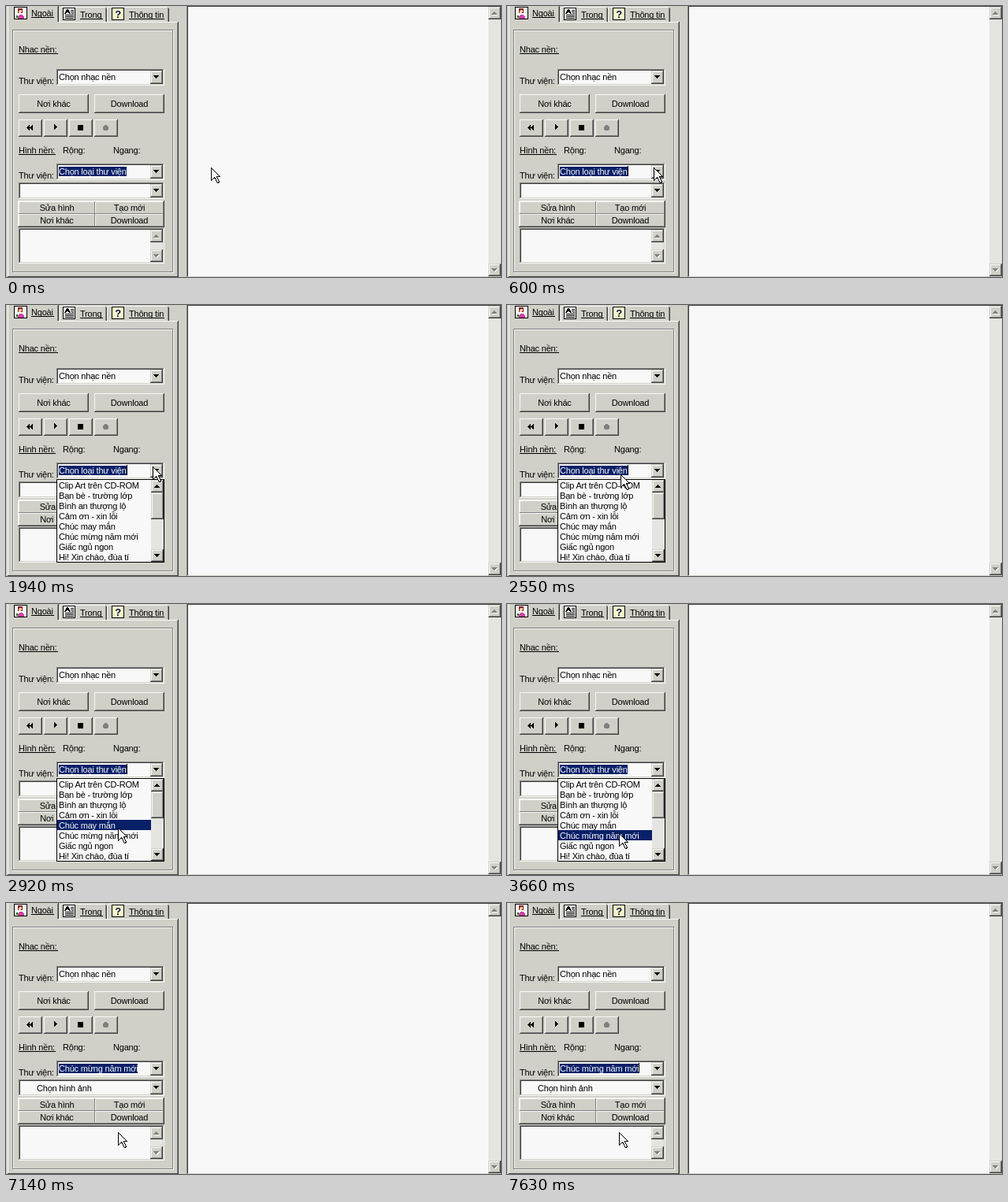
Recreate the animation shown at these times as an HTML page. Size 628 by 344 pixels, loop 8000 ms.

```html
<!DOCTYPE html>
<html lang="vi">
<head>
<meta charset="utf-8">
<style>
html, body { margin: 0; width: 100%; height: 100%; overflow: hidden; background: #d0d0c8; }
svg { display: block; width: 628px; height: 344px; shape-rendering: crispEdges; }
text { font: 11px "Liberation Sans", Arial, sans-serif; letter-spacing: -.2px; white-space: pre; }
</style>
</head>
<body>
<svg id="stage" viewBox="0 0 628 344" xmlns="http://www.w3.org/2000/svg"></svg>
<script>
const FACE = '#d0d0c8', PAPER = '#f8f8f8', SHADE = '#808080', DARK = '#000', EDGE = '#404040';
const NAVY = '#082068', TRACK = '#e4e4e0';
const LOOP = 8000, ROW = 13, LIST_TOP = 221, LIST_H = 106;
const ITEMS = ['Clip Art trên CD-ROM', 'Bạn bè - trường lớp', 'Bình an thượng lộ', 'Cảm ơn - xin lỗi',
  'Chúc may mắn', 'Chúc mừng năm mới', 'Giấc ngủ ngon', 'Hi! Xin chào, đùa tí'];

// pointer: time, x, y
const MOVES = [[0, 260, 205], [120, 257, 197], [360, 236, 200], [480, 208, 203], [600, 186, 205],
  [2060, 165, 206], [2180, 144, 206], [2550, 144, 215],
  [2800, 143, 256], [2920, 142, 284], [3040, 142, 291]];
const BLINKS = [480, 1080, 1700, 2180, 2550, 3660, 5030, 7140, 7630];

const rect = (x, y, w, h, fill, more = '') =>
  `<rect x="${x}" y="${y}" width="${w}" height="${h}" fill="${fill}" ${more}/>`;
const path = (d, fill, more = '') => `<path d="${d}" fill="${fill}" ${more}/>`;
const label = (x, y, s, more = '') => `<text x="${x}" y="${y}" ${more}>${s}</text>`;
const centred = (x, y, s) => label(x, y, s, 'text-anchor="middle"');

function underlined(x, y, s, w) {
  return label(x, y, s) + rect(x, y + 1, w, 1, DARK);
}
function bevel(x, y, w, h, outer, inner) {
  return rect(x, y, w, h, EDGE) + rect(x, y, w - 1, h - 1, outer) + rect(x + 1, y + 1, w - 2, h - 2, SHADE) +
    rect(x + 1, y + 1, w - 3, h - 3, inner) + rect(x + 2, y + 2, w - 4, h - 4, FACE);
}
const button = (x, y, w, h) => bevel(x, y, w, h, PAPER, FACE);
const knob = (x, y, w, h) => bevel(x, y, w, h, FACE, PAPER);
function thin(x, y, w, h) {
  return rect(x, y, w, h, SHADE) + rect(x, y, w - 1, h - 1, PAPER) + rect(x + 1, y + 1, w - 2, h - 2, FACE);
}
function sunken(x, y, w, h) {
  return rect(x, y, w, h, PAPER) + rect(x, y, w - 1, h - 1, SHADE) + rect(x + 1, y + 1, w - 2, h - 2, FACE) +
    rect(x + 1, y + 1, w - 3, h - 3, EDGE) + rect(x + 2, y + 2, w - 4, h - 4, PAPER);
}
function arrow(x, y, turn = 0, fill = DARK) {
  return path('M-3 0h7v1h-1v1h-1v1h-1v1h-1v-1h-1v-1h-1v-1h-1z', fill,
    `transform="translate(${x} ${y}) ${turn === 180 ? 'scale(1 -1)' : `rotate(${turn})`}"`);
}
function scrollButton(x, y, w, h, up, off) {
  const ax = x + (w >> 1) - 1, ay = y + (h >> 1) + (up ? 2 : -2);
  return knob(x, y, w, h) + (off ? arrow(ax + 1, ay + 1, up ? 180 : 0, PAPER) : '') +
    arrow(ax, ay, up ? 180 : 0, off ? SHADE : DARK);
}
function combo(x, y, w, h) {
  return sunken(x, y, w, h) + scrollButton(x + w - 18, y + 2, 16, h - 4, false);
}

function tabs() {
  return rect(2, 0, 1, 344, PAPER) +
    rect(67, 20, 151, 1, PAPER) + rect(217, 21, 1, 323, SHADE) + rect(218, 20, 1, 324, EDGE) +
    rect(2, 343, 217, 1, EDGE) +
    rect(65, 1, 1, 19, SHADE) + rect(66, 0, 1, 20, EDGE) +
    [[68, 127], [128, 206]].map(([a, b]) => rect(a + 1, 1, b - a - 2, 1, PAPER) + rect(a, 2, 1, 18, PAPER) +
      rect(b - 1, 2, 1, 18, SHADE) + rect(b, 3, 1, 17, EDGE)).join('') +
    // person
    rect(10, 1, 17, 16, DARK) + rect(11, 2, 15, 14, PAPER) +
    '<circle cx="18" cy="6" r="3.5" fill="#802020"/><circle cx="18" cy="7" r="2" fill="#f8c8a0"/>' +
    path('M15 16v-3l2-2h3l3 2v3z', '#d040a0') + rect(13, 12, 2, 3, '#208020') +
    // page
    rect(72, 2, 16, 16, DARK) + rect(73, 3, 14, 14, PAPER) +
    path('M77 4h2l3 6h-2l-1-2h-2l-1 2h-2z', DARK) +
    rect(82, 5, 4, 1, DARK) + rect(82, 7, 4, 1, DARK) + rect(83, 9, 3, 1, DARK) +
    [11, 13, 15].map(y => rect(75, y, 11, 1, DARK)).join('') +
    // help
    rect(134, 2, 16, 16, DARK) + rect(135, 3, 14, 14, '#f8f8c8') +
    label(142, 15, '?', 'text-anchor="middle" fill="#101050" style="font-weight:700;font-size:13px"') +
    underlined(32, 13, 'Ngoài', 29) + underlined(94, 15, 'Trong', 29) + underlined(156, 15, 'Thông tin', 45);
}

function panel() {
  const frame = (x, y, stroke) => rect(x + .5, y + .5, 203, 307, 'none', `stroke="${stroke}"`);
  return frame(9, 31, PAPER) + frame(8, 30, SHADE) +
    underlined(16, 59, 'Nhạc nền:', 50) +
    label(16, 99, 'Thư viện:') + combo(64, 80, 137, 21) + label(67, 94, 'Chọn nhạc nền') +
    button(16, 112, 89, 24) + centred(60.5, 128, 'Nơi khác') +
    button(112, 112, 89, 24) + centred(156.5, 128, 'Download') +
    [16, 48, 80, 112].map(x => button(x, 144, 30, 22)).join('') +
    arrow(30, 154, 90) + arrow(34, 154, 90) + arrow(61, 154, -90) + rect(91, 151, 7, 7, DARK) +
    '<circle cx="126.5" cy="154.5" r="3.5" fill="#808080"/>' +
    underlined(16, 187, 'Hình nền:', 47) + label(72, 187, 'Rộng:') + label(136, 187, 'Ngang:') +
    label(16, 219, 'Thư viện:') + combo(64, 200, 137, 21) + combo(16, 224, 185, 21) +
    rect(15, 247, 186, 34, EDGE) + rect(15, 247, 185, 33, PAPER) +
    thin(16, 248, 97, 16) + thin(113, 248, 87, 16) + thin(16, 264, 97, 16) + thin(113, 264, 87, 16) +
    centred(64.5, 260, 'Sửa hình') + centred(156.5, 260, 'Tạo mới') +
    centred(64.5, 276, 'Nơi khác') + centred(156.5, 276, 'Download') +
    sunken(16, 282, 185, 45) + rect(183, 284, 16, 41, TRACK) +
    scrollButton(183, 284, 16, 16, true, true) + scrollButton(183, 309, 16, 16, false, true);
}

function page() {
  return rect(229, 0, 399, 344, PAPER) + rect(229, 0, 1, 344, SHADE) + rect(230, 0, 1, 343, EDGE) +
    rect(230, 0, 398, 1, EDGE) + rect(612, 1, 16, 342, TRACK) +
    scrollButton(612, 1, 16, 16, true, true) + scrollButton(612, 327, 16, 16, false, true) +
    rect(230, 343, 398, 1, FACE);
}

function dropList() {
  return rect(64, LIST_TOP, 137, LIST_H, DARK) + rect(65, LIST_TOP + 1, 135, LIST_H - 2, PAPER) +
    rect(65, 0, 119, ROW, NAVY, 'id="hover"') +
    ITEMS.map((s, i) => label(67, 233 + i * ROW, s, 'class="item"')).join('') +
    rect(184, 222, 16, 104, TRACK) + scrollButton(184, 222, 16, 16, true) +
    knob(184, 238, 16, 34) + scrollButton(184, 310, 16, 16, false);
}

const stage = document.getElementById('stage');
stage.innerHTML = `<clipPath id="clip">${rect(64, 0, 137, 0, DARK, 'id="window"')}</clipPath>` +
  rect(0, 0, 628, 344, FACE) + tabs() + panel() + page() +
  `<g id="pressed">${rect(183, 202, 16, 17, SHADE) + rect(184, 203, 14, 15, FACE) + arrow(191, 209)}</g>` +
  rect(67, 204, 86, 12, NAVY, 'id="mark"') + label(67, 214, '', `id="choice" fill="${PAPER}"`) +
  rect(153, 203, 1, 13, DARK, 'id="caret"') +
  label(39, 239, 'Chọn hình ảnh', 'id="picture"') +
  `<g id="blank">${rect(64, LIST_TOP, 137, 1, DARK) + rect(64, LIST_TOP + 1, 137, 24, PAPER)}</g>` +
  `<g clip-path="url(#clip)"><g id="list">${dropList()}</g></g>` +
  path('M.5 .5V16.5L4.5 12.5L5.5 14.5L8.5 19.5H9.5L10.5 17.5L7.5 12.5V11.5H11.5Z', PAPER,
    'stroke="#000" id="pointer"');

const $ = id => document.getElementById(id);
const items = [...stage.querySelectorAll('.item')];
const set = (id, attrs) => { for (const k in attrs) $(id).setAttribute(k, attrs[k]); };
const show = (id, on) => set(id, { visibility: on ? 'visible' : 'hidden' });

function draw(t) {
  const [, x, y] = MOVES.filter(m => m[0] <= t).pop();
  const closing = t >= 5030 && t < 7140, chosen = t >= 7140;
  set('pointer', { transform: `translate(${x} ${y})` });
  show('pressed', t >= 960 && t < 1940);

  // the list slides down out of the box, then is wiped away in part
  const h = t < 960 || chosen ? 0 : t < 1080 ? 40 : t < 1330 ? 84 : LIST_H;
  set('list', { transform: `translate(0 ${h - LIST_H})` });
  set('window', closing ? { y: 246, height: 36 } : { y: LIST_TOP, height: h });
  show('blank', closing);

  const row = t >= 2800 && t < 5030 ? Math.floor((y - LIST_TOP - 1) / ROW) : -1;
  set('hover', { y: 222 + row * ROW });
  show('hover', row >= 0);
  items.forEach((e, i) => e.setAttribute('fill', i === row ? PAPER : DARK));

  const text = chosen ? ITEMS[5] : 'Chọn loại thư viện';
  if ($('choice').textContent !== text) $('choice').textContent = text;
  const w = Math.round($('choice').getComputedTextLength());
  set('mark', { width: w });
  set('caret', { x: 67 + w });
  show('caret', BLINKS.filter(b => b <= t).length % 2);
  show('picture', chosen);
}

const start = performance.now();
function tick() {
  draw((performance.now() - start) % LOOP);
  requestAnimationFrame(tick);
}
tick();
</script>
</body>
</html>
```
